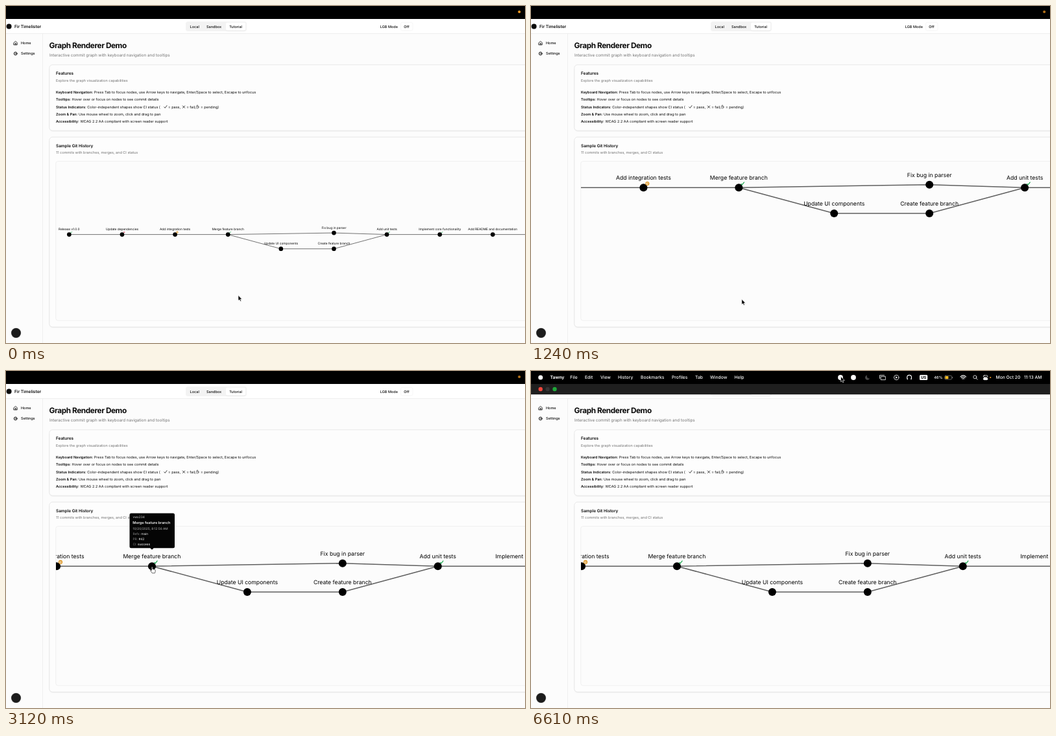
An HTML page for the animation above (6640 ms loop, 800x520 px).

```html
<!DOCTYPE html>
<html lang="en">
<head>
<meta charset="utf-8">
<title>Graph Renderer Demo</title>
<style>
  html, body { margin: 0; width: 100%; height: 100%; overflow: hidden; background: #fcfcfc; }
  svg { display: block; width: 800px; height: 520px; }
  text { font-family: Inter, "Liberation Sans", sans-serif; font-size: 5.5px; fill: #0a0a0a; white-space: pre; text-rendering: geometricPrecision; }
  .m { font-weight: 500; }
  .b { font-weight: 600; }
  .h { font-size: 6.4px; font-weight: 600; }
  .g { fill: #737373; }
  .card { fill: #fdfdfd; stroke: #e5e5e5; stroke-width: .8; }
  .icon { fill: none; stroke: #111; stroke-width: .8; stroke-linecap: round; stroke-linejoin: round; }
  #graph text { font-size: 4.82px; text-anchor: middle; fill: #000; }
  #edges { fill: none; stroke: #5f5f5f; stroke-width: .88; }
  #status path, #status circle { fill: none; stroke-width: .65; }
  #tip text { font-size: 4.8px; fill: #f5f5f5; }
  #tip .g { fill: #8d8d8d; }
  #menu text { font-size: 6.75px; font-weight: 500; fill: #fff; }
  #menu .icon { stroke: #fff; }
</style>
</head>
<body>
<svg viewBox="0 0 800 520">
  <defs>
    <clipPath id="view"><rect x="77" y="240" width="723" height="245"/></clipPath>
    <filter id="soft" x="-5%" y="-10%" width="110%" height="125%">
      <feDropShadow dx="0" dy=".6" stdDeviation=".7" flood-opacity=".1"/>
    </filter>
  </defs>

  <rect width="800" height="520" fill="#fcfcfc"/>
  <rect y="20" width="800" height="22.5" fill="#fff"/>
  <path d="M0 42.5H800M56.5 42.5V520" stroke="#ebebeb" stroke-width=".8"/>

  <!-- header -->
  <circle cx="4.6" cy="31.5" r="4" fill="#0a0a0a"/>
  <text class="b" x="13" y="33.8" style="font-size:6.5px">Fir Timelister</text>
  <rect x="277" y="24" width="94" height="15" rx="3.5" fill="#f3f3f3"/>
  <rect x="339" y="25.5" width="30.3" height="12.2" rx="2.5" fill="#fff" filter="url(#soft)"/>
  <g class="m">
    <text x="283.6" y="33.6">Local</text>
    <text x="309" y="33.6">Sandbox</text>
    <text x="344.2" y="33.6">Tutorial</text>
    <text x="576.8" y="33.6">LGB Mode</text>
  </g>
  <rect x="608.5" y="25.3" width="18.5" height="12.6" rx="2.5" fill="#fff" stroke="#f3f3f3" stroke-width=".7"/>
  <text class="m" x="613.3" y="33.6">Off</text>

  <!-- sidebar -->
  <path class="icon" d="M12.1 56.6L14.7 54.4L17.3 56.6V59.9H12.1ZM13.9 59.8V57.6H15.5V59.8"/>
  <g class="icon"><circle cx="14.7" cy="73.4" r="2.4" stroke-width="1"/><circle cx="14.7" cy="73.4" r=".8" stroke-width=".6"/></g>
  <text class="m" x="23" y="59.2">Home</text>
  <text class="m" x="23" y="75.4">Settings</text>
  <circle cx="15.5" cy="504.5" r="8" fill="#dcdcdc"/>
  <circle cx="15.5" cy="504.5" r="7.4" fill="#1c1c1c"/>

  <!-- content -->
  <text x="66.6" y="65.2" style="font-size:11.8px;font-weight:700;letter-spacing:-.035em">Graph Renderer Demo</text>
  <text class="g" x="67" y="78.3" style="font-size:6.25px">Interactive commit graph with keyboard navigation and tooltips</text>
  <rect class="card" x="66.8" y="90.7" width="760" height="101.5" rx="5" filter="url(#soft)"/>
  <text class="h" x="77" y="106.3">Features</text>
  <text class="g" x="77" y="116.6">Explore the graph visualization capabilities</text>
  <g id="list"></g>
  <path class="icon" stroke-width=".6" d="M243.8 155.8L245.2 157.4L248 153.6M272.3 154L275.7 157.4M275.7 154L272.3 157.4"/>
  <g class="icon" style="stroke-width:.5"><circle cx="295" cy="156" r="2.1"/><path d="M295 154.9V156H295.9M294.3 153.2H295.7"/></g>
  <text x="250" y="157.6">= pass,</text>
  <text x="278.2" y="157.6">= fail,</text>
  <text x="300" y="157.6">= pending)</text>

  <rect class="card" x="66.8" y="202.2" width="760" height="293" rx="5" filter="url(#soft)"/>
  <text class="h" x="77" y="217.8">Sample Git History</text>
  <text class="g" x="77" y="228.2">11 commits with branches, merges, and CI status</text>
  <rect x="76.7" y="239.6" width="760" height="245.7" rx="3.5" fill="#fcfcfc" stroke="#ebebeb" stroke-width=".7"/>

  <g clip-path="url(#view)">
    <g id="graph"><path id="edges"/><g id="nodes"></g><g id="status"></g></g>
  </g>

  <g id="tip">
    <path d="M193 219.4H257.5a2.5 2.5 0 0 1 2.5 2.5V270.7a2.5 2.5 0 0 1-2.5 2.5H227.7L225 275.8L222.3 273.2H193a2.5 2.5 0 0 1-2.5-2.5V221.9a2.5 2.5 0 0 1 2.5-2.5Z" fill="#050505"/>
    <text x="195.5" y="227.2" style="fill:#d8d8d8">vwx234</text>
    <text class="b" x="195.3" y="236.3" style="font-size:5.55px">Merge feature branch</text>
    <text x="195.5" y="244.9" style="fill:#bdbdbd">10/20/2025, 8:12:56 AM</text>
    <text x="195.5" y="253"><tspan class="g">Refs:</tspan> main</text>
    <text x="195.5" y="261.2"><tspan class="g">PR:</tspan> #42</text>
    <text x="195.5" y="269.3"><tspan class="g">CI:</tspan> <tspan class="m">success</tspan></text>
  </g>

  <!-- system bars -->
  <g id="frame">
    <rect y="20" width="800" height="16" fill="#1f1f1f"/>
    <path d="M0 36.3H800" stroke="#000" stroke-opacity=".3" stroke-width=".7"/>
    <circle cx="14.7" cy="28" r="3.2" fill="#f4463c"/>
    <circle cx="25.6" cy="28" r="3.2" fill="#343434"/>
    <circle cx="36.5" cy="28" r="3.2" fill="#1fa83a"/>
  </g>
  <rect width="800" height="20" fill="#000"/>
  <circle id="lamp" cx="791.2" cy="9" r="2.1" fill="#f59a23"/>
  <g id="menu">
    <circle cx="14.7" cy="10" r="3.5" fill="#fff"/>
    <g id="words"></g>
    <circle cx="477" cy="10" r="3.9" fill="#fff"/>
    <circle cx="497" cy="10" r="3.9" fill="#fff"/>
    <path d="M518 6.6A3.6 3.6 0 1 0 522 11.4A3.4 3.4 0 0 1 518 6.6Z" fill="#4a4a4a"/>
    <g class="icon">
      <path d="M537.5 11.5V6.6H544.5M539.6 8.4H546.3V13.6H539.6Z"/>
      <circle cx="563.2" cy="10" r="3.7"/>
      <path d="M579.7 11.5V9.8A3.4 3.4 0 0 1 586.5 9.8V11.5M580.2 11V13M586 11V13" stroke-width="1.1"/>
      <path d="M661.9 8.8Q666.2 5 670.5 8.8M663.4 10.5Q666.2 8 669 10.5M664.9 12.1Q666.2 11 667.5 12.1" stroke-width="1.1"/>
      <circle cx="684.3" cy="9.3" r="2.5"/><path d="M686.2 11.2L688.2 13.2"/>
      <rect x="697.3" y="6.8" width="6.6" height="2.8" rx="1.4"/>
      <rect x="697.3" y="10.8" width="6.6" height="2.8" rx="1.4" fill="#fff"/>
      <rect x="637.6" y="7.2" width="11" height="5.8" rx="1.6" style="stroke:#999;stroke-width:.6"/>
    </g>
    <path d="M562.2 8.3L565.1 10L562.2 11.7Z" fill="#fff"/>
    <rect x="638.4" y="8" width="5" height="4.2" rx=".9" fill="#f5b921"/>
    <path d="M649.6 9V11.2" stroke="#999" stroke-width=".8"/>
    <rect x="599" y="6" width="12.2" height="8" rx="1.6" fill="#fff"/>
    <text x="600.9" y="12.2" style="fill:#000;font-size:6px;font-weight:700">US</text>
    <text x="621.3" y="12.2" style="font-size:5.8px">46%</text>
    <circle cx="708.2" cy="10" r="1.1" fill="#f59a23"/>
  </g>

  <g id="cursor">
    <path id="arrow" d="M0 0V8.1L1.9 6.5L3.1 9.3L4.5 8.7L3.3 6H5.8Z" fill="#000" stroke="#fff" stroke-width=".6" stroke-linejoin="round"/>
    <path id="hand" d="M.2 .6Q1 -.4 1.8 .6V4Q2.7 3.4 3.3 4.2Q4.2 3.7 4.7 4.5Q5.7 4.2 6 5.2V7.4Q5.9 8.7 5.2 10H1.2Q.2 8.4 -1.7 6.2Q-1.7 5 -.6 5.5L.2 6.2Z" fill="#fff" stroke="#000" stroke-width=".6" stroke-linejoin="round"/>
  </g>
</svg>

<script>
const LOOP = 6640;
const $ = id => document.getElementById(id);

function add(parent, tag, attrs, text) {
  const el = document.createElementNS("http://www.w3.org/2000/svg", tag);
  for (const k in attrs) el.setAttribute(k, attrs[k]);
  if (text) el.textContent = text;
  parent.append(el);
  return el;
}

// Feature list
[
  ["Keyboard Navigation:", " Press Tab to focus nodes, use Arrow keys to navigate, Enter/Space to select, Escape to unfocus"],
  ["Tooltips:", " Hover over or focus on nodes to see commit details"],
  ["Status Indicators:", " Color-independent shapes show CI status ("],
  ["Zoom & Pan:", " Use mouse wheel to zoom, click and drag to pan"],
  ["Accessibility:", " WCAG 2.2 AA compliant with screen reader support"]
].forEach(([name, info], i) => {
  const line = add($("list"), "text", { x: 77, y: 134.6 + i * 11.45 });
  add(line, "tspan", { class: "b" }, name);
  add(line, "tspan", {}, info);
});

// Menu bar words
[
  [29.5, "Tawny"], [60.3, "File"], [83, "Edit"], [107, "View"], [134, "History"],
  [169, "Bookmarks"], [217, "Profiles"], [253, "Tab"], [276, "Window"], [313.5, "Help"],
  [716.5, "Mon Oct 20"], [760, "11:13 AM"]
].forEach(([x, word], i) => {
  const el = add($("words"), "text", { x, y: 12.4 }, word);
  if (!i) el.style.fontWeight = 700;
});

// Commit graph: column, row, label, status
const ROWS = [352.5, 350, 374.6];
const colX = c => 97.4 + c * 81.62;
const commits = [
  [0, 0, "Release v1.0.0", "pass"],
  [1, 0, "Update dependencies", "fail"],
  [2, 0, "Add integration tests", "wait"],
  [3, 0, "Merge feature branch", "pass"],
  [4, 2, "Update UI components"],
  [5, 2, "Create feature branch"],
  [5, 1, "Fix bug in parser"],
  [6, 0, "Add unit tests", "pass"],
  [7, 0, "Implement core functionality", "pass"],
  [8, 0, "Add README and documentation"]
];
const point = (c, r) => colX(c) + " " + ROWS[r];
const route = pts => "M" + pts.map(p => point(...p)).join("L");
$("edges").setAttribute("d",
  route([[0, 0], [3, 0], [5, 1], [6, 0], [9, 0]]) + route([[3, 0], [4, 2], [5, 2], [6, 0]]));

const marks = {
  pass: ["#16a34a", "M-1.4 .2L-.5 1.1L1.4 -1.2"],
  fail: ["#c81e3a", "M-1 -1L1 1M1 -1L-1 1"],
  wait: ["#d98a0b", "M0 -.8V.1H.7"]
};
for (const [c, r, label, status] of commits) {
  const x = colX(c), y = ROWS[r];
  add($("nodes"), "circle", { cx: x, cy: y, r: 3.35 });
  add($("nodes"), "text", { x, y: y - 6.5 }, label);
  if (!status) continue;
  const [stroke, d] = marks[status];
  const g = add($("status"), "g", { stroke, transform: `translate(${x + 3.3} ${y - 3.5})` });
  add(g, "path", { d });
  if (status === "wait") add(g, "circle", { r: 1.35 });
}

// Smooth, overshoot-free interpolation through rows of [time, value, ...]
function track(rows, t, k = 1) {
  const n = rows.length - 1;
  if (t <= rows[0][0]) return rows[0][k];
  if (t >= rows[n][0]) return rows[n][k];
  let i = 0;
  while (rows[i + 1][0] <= t) i++;
  const slope = j => j < 0 || j >= n ? 0 : (rows[j + 1][k] - rows[j][k]) / (rows[j + 1][0] - rows[j][0]);
  const tangent = j => {
    const a = slope(j - 1), b = slope(j);
    return a * b <= 0 ? 0 : 2 * a * b / (a + b);
  };
  const [a, b] = [rows[i], rows[i + 1]];
  const h = b[0] - a[0], u = (t - a[0]) / h, v = 1 - u;
  return v * v * (1 + 2 * u) * a[k] + u * u * (3 - 2 * u) * b[k]
    + h * u * v * (v * tangent(i) - u * tangent(i + 1));
}

const zoom = [[0, 1], [150, 1.13], [300, 1.33], [520, 1.618], [780, 1.8]];
const pan = [[1120, 0, 0], [1240, -15, .7], [1360, -38, 10], [1600, -78, 18.5], [1900, -105, 21.4], [2030, -110.5, 21.7]];
const pointer = [
  [0, 358, 446.5], [850, 358, 446.5], [1000, 352, 450], [1120, 340, 452], [1240, 325, 452.5],
  [1360, 302, 461.5], [1600, 262, 468], [1900, 236, 468.8], [2060, 232, 468],
  [2160, 246, 440], [2300, 261.8, 386.5], [2500, 243, 350], [2700, 227, 321], [2850, 225, 306],
  [3390, 223.8, 300.3], [5420, 223.8, 300.3], [5550, 244, 291], [5700, 330, 235],
  [5940, 510, 106], [6000, 522.5, .3], [6200, 517, 2], [6600, 477.5, 8.5]
];
const tipFade = [[2820, 0], [2950, 1], [5550, 1], [5640, 0]];
const barSlide = [[6100, 0], [6420, 1]];
const lampGlow = [[0, 1], [400, .72], [6100, .72]];

function draw(now) {
  const t = now % LOOP;
  const s = track(zoom, t);
  const x = 350.6 - 8.4 * s + track(pan, t, 1);
  const y = 444 - 91.4 * s + track(pan, t, 2);
  $("graph").setAttribute("transform",
    `translate(${x - s * colX(3)} ${y - s * ROWS[0]}) scale(${s})`);

  $("cursor").setAttribute("transform", `translate(${track(pointer, t, 1)} ${track(pointer, t, 2)})`);
  const onNode = t >= 2800 && t < 5530;
  $("hand").style.display = onNode ? "" : "none";
  $("arrow").style.display = onNode ? "none" : "";
  $("tip").style.opacity = track(tipFade, t);

  const bar = track(barSlide, t);
  $("menu").setAttribute("transform", `translate(0 ${20 * (bar - 1)})`);
  $("menu").style.opacity = bar;
  $("frame").setAttribute("transform", `translate(0 ${17 * (bar - 1)})`);
  $("lamp").style.opacity = track(lampGlow, t) * (1 - bar);
}

function tick() {
  draw(performance.now());
  requestAnimationFrame(tick);
}
tick();
</script>
</body>
</html>
```
